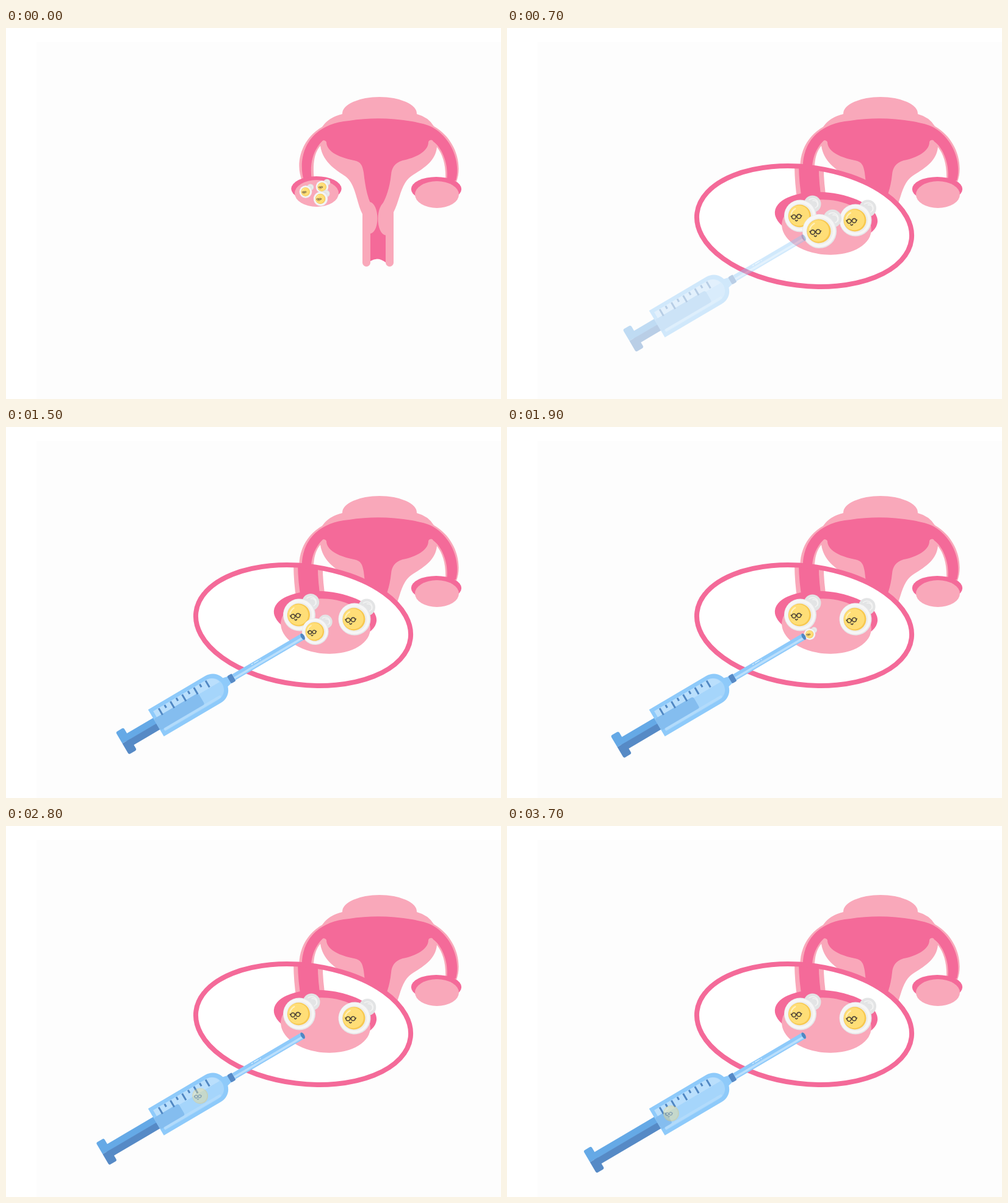
Recreate the animation shown at these times as an HTML page. Size 811 px wide and 608 px high, loop 4.3 s.

```html
<!DOCTYPE html>
<html lang="en">
<head>
<meta charset="utf-8">
<title>Egg retrieval</title>
<style>
  html, body { margin: 0; width: 100%; height: 100%; overflow: hidden; background: #fff; }
  svg { display: block; width: 811px; height: 608px; }
  .light { fill: #f9a8ba; }
  .dark { fill: #f46a99; }
</style>
</head>
<body>
<svg viewBox="0 0 811 608" xmlns="http://www.w3.org/2000/svg">
  <defs>
    <clipPath id="lens"><ellipse cx="487" cy="325" rx="177" ry="97.3" transform="rotate(7 487 325)"/></clipPath>
    <g id="yolk">
      <circle r="18.5" fill="#f8c84f"/>
      <circle cx="-1" cy="-.5" r="16.8" fill="#ffde77"/>
      <path d="M-14,-3 A14,14 0 0 1 -7,-12" fill="none" stroke="#fff1bd" stroke-width="2" stroke-linecap="round"/>
      <g fill="none" stroke="#4a4238" stroke-width="1.6" stroke-linecap="round">
        <circle cx="-9.5" cy="1.6" r="3.4"/>
        <circle cx="-1.2" cy=".8" r="3.4"/>
        <path d="M-6,1 L-4.6,.9 M-13,1.5 L-14,.6 M2.3,.4 L3.4,-.4"/>
        <path d="M-7,7 Q-5,9.5 -3.6,6.8"/>
      </g>
    </g>
    <g id="egg">
      <circle cx="20" cy="-19.5" r="14" fill="#e3e4e5"/>
      <path d="M14,-26 A9,9 0 0 1 28,-15 M20,-25 A6,6 0 0 1 24,-13" fill="none" stroke="#f3f3f3" stroke-width="1.5"/>
      <circle r="26.5" fill="#e6e7e9"/>
      <circle cx="-.5" cy="-.5" r="25.3" fill="#f6f6f6"/>
      <circle r="20.5" fill="#ededeb"/>
      <use href="#yolk" x="-1"/>
    </g>
  </defs>

  <rect width="811" height="608" fill="#fff"/>
  <rect x="50" y="23" width="761" height="585" fill="#fdfdfd"/>

  <g id="womb">
    <ellipse class="light" cx="612" cy="140" rx="61" ry="27"/>
    <path class="light" d="M486,252 C473,225 482,183 518,162 Q529,146 551,141 H673 Q692,146 701,161
      C735,180 749,222 738,252 L720,250 C721,225 716,208 706,195 C704,217 686,229 668,240
      C646,253 647,278 635,302 V384.500 A6.500,6.500 0 0 1 622,384.500 V300 H597 V384.500
      A6.500,6.500 0 0 1 584,384.500 V305 C574,286 573,255 556,243 C545,235 519,222 515,193
      C505,205 502,222 505,250 Z"/>
    <path class="dark" d="M488,250 C477,212 492,158 562,152 Q612,144 665,153 C680,156 690,158 699,163
      C732,182 745,222 737,250 L722,250 C726,222 714,196 700,186 A4.200,4.200 0 0 0 692,188
      C691,203 670,213 650,217 C636,221 632,230 631,240 C629,260 623,278 617,288 L622,292
      V384 Q609,374 597,382 V287 C591,273 588,255 586,237 C584,226 582,219 570,217
      C540,211 525,200 525,187 A4.200,4.200 0 0 0 517.500,186 C503,201 497,222 501,250 Z"/>
    <path class="light" d="M596,285 C612,288 613,334 597,337 Z M623,284 C605,288 605,338 623,340 Z"/>
    <ellipse class="dark" cx="508.500" cy="263.500" rx="41.200" ry="20.500"/>
    <ellipse class="light" cx="509" cy="271" rx="36" ry="22"/>
    <ellipse class="dark" cx="705" cy="264" rx="41.200" ry="20"/>
    <ellipse class="light" cx="706" cy="273" rx="36" ry="22"/>
    <use href="#egg" transform="translate(491 268.500) scale(.39)"/>
    <use href="#egg" transform="translate(518 260.500) scale(.39)"/>
    <use href="#egg" transform="translate(515.500 280) scale(.44)"/>
  </g>

  <g id="zoom">
    <g clip-path="url(#lens)">
      <rect x="300" y="215" width="380" height="220" fill="#fff"/>
      <path class="light" d="M471,220 H519 Q518,250 524,285 H476 Q471,255 471,220 Z"/>
      <path class="dark" d="M478,220 H511 Q510,250 516,285 H484 Q478,255 478,220 Z"/>
    </g>
    <ellipse class="dark" cx="523" cy="309.500" rx="84.500" ry="40" transform="rotate(6 523 309.500)"/>
    <ellipse class="light" cx="523.500" cy="326.500" rx="73.500" ry="45" transform="rotate(5 523.500 326.500)"/>
    <ellipse cx="487" cy="325" rx="177" ry="97.300" transform="rotate(7 487 325)" fill="none" stroke="#f46a99" stroke-width="8"/>
    <use id="eggL" href="#egg"/>
    <use id="eggR" href="#egg"/>
    <use id="eggM" href="#egg"/>
  </g>

  <g id="syringe">
    <!-- local axis: needle tip at 0,0, barrel towards -x -->
    <g transform="translate(487 343) rotate(-30.500)">
      <g id="plunger">
        <rect x="-400" y="-9.500" width="130" height="11" fill="#65a9e6"/>
        <rect x="-400" y="1" width="130" height="11.500" fill="#568ac6"/>
        <path d="M-393,1 V-17.500 Q-393,-20.500 -396,-20.500 H-405 Q-408,-20.500 -408,-17.500 V1 Z" fill="#65a9e6"/>
        <path d="M-393,1 V19 Q-393,22 -396,22 H-405 Q-408,22 -408,19 V1 Z" fill="#568ac6"/>
      </g>
      <path d="M-152,-9 L-139,-6 V6 L-152,9 Z" fill="#8ecafa"/>
      <path d="M-280,-25.500 H-172 C-155,-25.500 -147,-12 -147,0 S-155,25.500 -172,25.500 H-280 Z" fill="#8ecafa"/>
      <path d="M-274,-19 H-174 C-160,-19 -154,-9 -154,0 S-160,19 -174,19 H-274 Z" fill="#a5d5fb"/>
      <path d="M-274,-19 H-174 C-164,-19 -158,-13 -156,-5 H-274 Z" fill="#badffc"/>
      <rect id="head" x="-280" y="-7.500" height="22" rx="4" fill="#84bdef"/>
      <rect x="-274" y="14" width="108" height="4" rx="2" fill="#badffc" opacity=".65"/>
      <g id="ticks" stroke="#5087c3" stroke-width="3"/>
      <rect x="-141" y="-7" width="9" height="14" rx="2" fill="#568ac6"/>
      <rect x="-132" y="-5.500" width="132" height="11" fill="#8ecafa"/>
      <rect x="-132" y="0" width="132" height="3.500" fill="#badffc"/>
      <path d="M-97,-3 H-79" stroke="#d9eefd" stroke-width="1.200" stroke-dasharray="3 2 9 2"/>
      <ellipse cx="-1" rx="2.800" ry="5.700" fill="#5087c3"/>
    </g>
    <use id="caught" href="#yolk" opacity=".36"/>
  </g>
</svg>
<script>
  const LOOP = 4300, STEP = 100;
  const $ = id => document.getElementById(id);
  const clamp = x => Math.max(0, Math.min(1, x));
  const span = (t, from, to) => clamp((t - from) / (to - from));
  const mix = (a, b, p) => a + (b - a) * p;
  const set = (id, name, value) => $(id).setAttribute(name, value);
  const show = (id, on) => set(id, 'visibility', on ? 'inherit' : 'hidden');
  const place = (id, x, y, s = 1, r = 0) =>
    set(id, 'transform', `translate(${x} ${y}) rotate(${r}) scale(${s})`);

  // alternating long and short graduations
  let marks = '';
  for (let i = 0; i < 9; i++)
    marks += `M${-264 + i * 11.15},-18.5 v${i % 2 ? 5.5 : 12.5} `;
  $('ticks').innerHTML = `<path d="${marks}"/>`;

  const teeter = (t, start) => -4 * Math.sin(2 * Math.PI * span(t, start, start + 1800));

  function draw(time) {
    const t = Math.floor(time / STEP) * STEP;

    const zoom = Math.min(1, t * .00281);
    show('zoom', zoom > 0);
    set('zoom', 'transform', `translate(515.5 290) scale(${zoom}) translate(-515.5 -290)`);

    place('eggL', 480.5, 308, 1, teeter(t, 1000));
    place('eggR', 571, 315, 1, teeter(t, 1500));

    // the middle egg is drawn into the needle tip
    const suck = span(t, 1300, 2200);
    show('eggM', suck < 1);
    place('eggM', mix(512, 488, suck), mix(333, 343, suck), 1.06 * (1 - suck));

    const fade = span(t, 500, 1000);
    show('syringe', fade > 0);
    set('syringe', 'opacity', fade);

    const pull = span(t, 1100, 3700);
    const out = 75 * (1 - pull);
    set('plunger', 'transform', `translate(${out} 0)`);
    set('head', 'width', 21 + out);

    const slide = span(t, 2200, 3600);
    show('caught', slide > 0);
    place('caught', mix(355, 269, slide), mix(421, 471, slide), .7 * mix(.15, 1, span(t, 2200, 2700)));
  }

  const begin = performance.now();
  function tick() {
    draw((performance.now() - begin) % LOOP);
    requestAnimationFrame(tick);
  }
  draw(0);
  requestAnimationFrame(tick);
</script>
</body>
</html>
```
